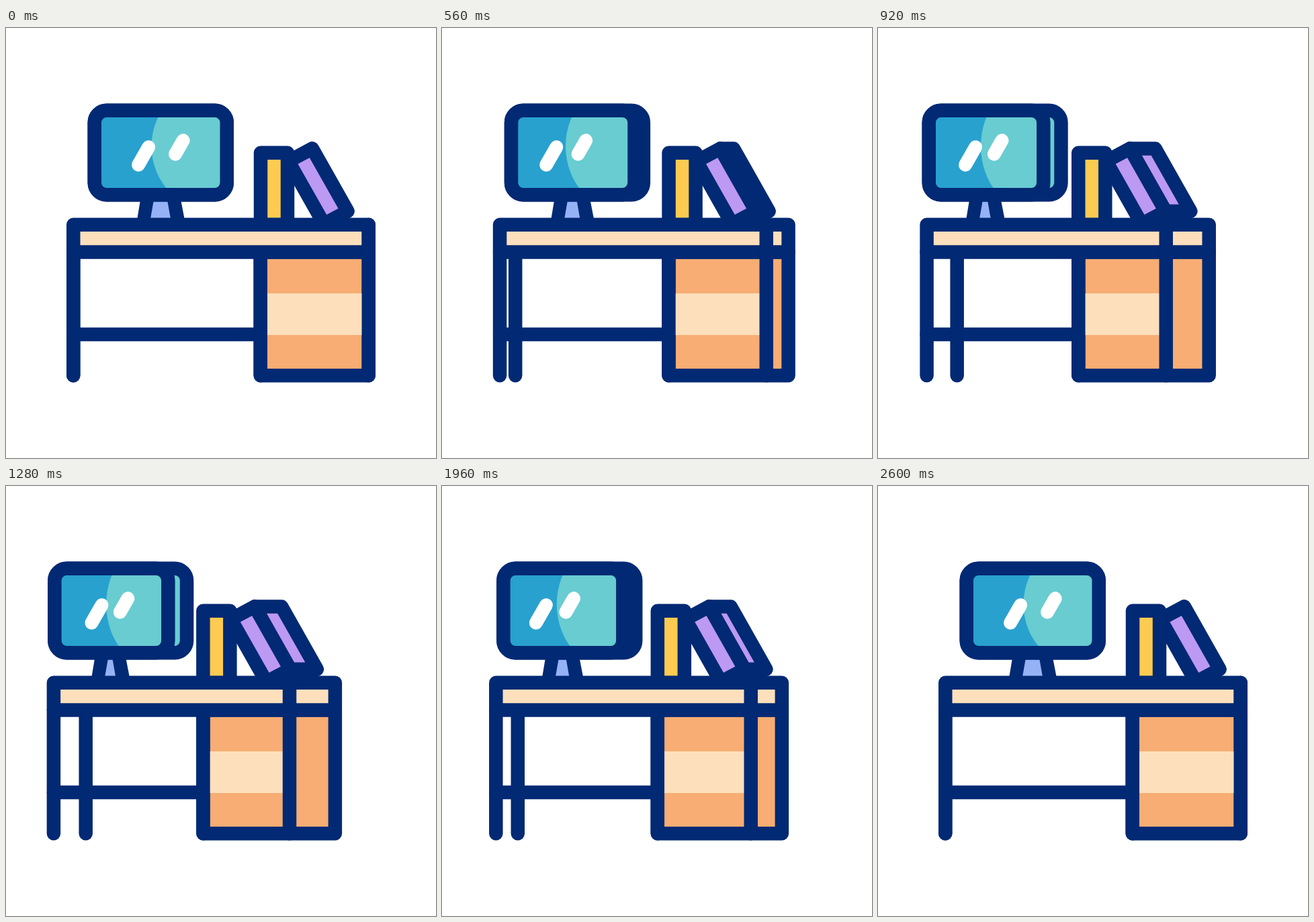
An HTML page with a canvas for the animation above (3000 ms loop, 640x640 px).

```html
<!DOCTYPE html>
<html lang="en">
<head>
<meta charset="utf-8">
<title>Turning desk</title>
<style>
  html, body { margin: 0; width: 100%; height: 100%; overflow: hidden; background: #fff; }
  canvas { display: block; width: 640px; height: 640px; }
</style>
</head>
<body>
<canvas id="stage" width="640" height="640"></canvas>
<script>
const LOOP = 3000, STEP = 40, LINE = 20.5, HALF = LINE / 2;
const INK = '#022973', CREAM = '#fddfbc', ORANGE = '#f7ad73', BLUE = '#28a1ce',
      TEAL = '#68ccd1', STEEL = '#95b2f6', YELLOW = '#fccb50', PURPLE = '#bc99f2';

// time, turn of the desk, slide of the glints, depth of the leaning book
const KEYS = [
  [0, 0, 0, 0], [200, 0, 0, 0], [360, .09, .13, 4], [560, .483, .6, 19.5],
  [760, .83, .88, 32.5], [920, .941, .96, 37.5], [1120, .985, .985, 39.3],
  [1360, 1, 1, 40], [1720, .97, .977, 39], [1880, .83, .91, 36],
  [1960, .678, .82, 32], [2280, .11, .157, 12.5], [2600, 0, 0, 0], [3000, 0, 0, 0]
];

const secant = (i, c) => (KEYS[i + 1][c] - KEYS[i][c]) / (KEYS[i + 1][0] - KEYS[i][0]);

function slope(i, c) {
  if (i === 0 || i === KEYS.length - 1) return 0;
  const a = secant(i - 1, c), b = secant(i, c);
  return a * b > 0 ? 2 * a * b / (a + b) : 0;
}

// monotone cubic between the keys
function track(t, c) {
  let i = 0;
  while (i < KEYS.length - 2 && t >= KEYS[i + 1][0]) i++;
  const span = KEYS[i + 1][0] - KEYS[i][0], u = (t - KEYS[i][0]) / span, v = 1 - u;
  return KEYS[i][c] * (1 + 2 * u) * v * v + KEYS[i + 1][c] * u * u * (3 - 2 * u)
    + span * u * v * (slope(i, c) * v - slope(i + 1, c) * u);
}

const ctx = document.getElementById('stage').getContext('2d');
ctx.lineJoin = ctx.lineCap = 'round';

function paint(fill, stroked) {
  if (fill) {
    ctx.fillStyle = fill;
    ctx.fill();
  }
  if (stroked) {
    ctx.strokeStyle = INK;
    ctx.lineWidth = LINE;
    ctx.stroke();
  }
}

function poly(points, fill, stroked) {
  ctx.beginPath();
  points.forEach(([x, y]) => ctx.lineTo(x, y));
  ctx.closePath();
  paint(fill, stroked);
}

function box(x1, y1, x2, y2, fill, stroked) {
  poly([[x1, y1], [x2, y1], [x2, y2], [x1, y2]], fill, stroked);
}

function line(x1, y1, x2, y2, color = INK, width = LINE) {
  ctx.beginPath();
  ctx.moveTo(x1, y1);
  ctx.lineTo(x2, y2);
  ctx.strokeStyle = color;
  ctx.lineWidth = width;
  ctx.stroke();
}

function roundBox(x1, y1, x2, y2, r) {
  ctx.beginPath();
  ctx.moveTo(x1 + r, y1);
  ctx.arcTo(x2, y1, x2, y2, r);
  ctx.arcTo(x2, y2, x1, y2, r);
  ctx.arcTo(x1, y2, x1, y1, r);
  ctx.arcTo(x1, y1, x2, y1, r);
  ctx.closePath();
}

function drawBooks(p, depth) {
  const dx = -85.8 * p;
  const top = [455.8 + dx, 179.4], foot = [508.6 + dx, 272.8];
  const back = ([x, y]) => [x + depth, y];
  if (depth > .2) poly([top, back(top), back(foot), foot], PURPLE, true);
  poly([[420.4 + dx, 198.2], top, foot, [473.2 + dx, 291.6]], PURPLE, true);
  box(379 + dx, 185.8, 419 + dx, 293, YELLOW, true);
}

function drawMonitor(p, q) {
  const l = 68 * p, r = 82 * p;
  poly([[201 - l, 250], [259 - r, 250], [266 - r, 286], [195 - l, 286]], INK);
  poly([[221 - l, 250], [239 - r, 250], [245 - r, 284], [215 - l, 284]], STEEL);

  const left = 131.75 - 59.5 * p, top = 122.75, bottom = 248.25, radius = 18;
  roundBox(left, top, 328.75 - 59.8 * p, bottom, radius);
  paint(TEAL, true);

  const right = 328.75 - 87.6 * p;
  roundBox(left, top, right, bottom, radius);
  paint(BLUE);
  ctx.save();
  ctx.clip();
  const rx = 99 * (1 - .16 * p);
  ctx.beginPath();
  ctx.ellipse(216.5 - 67.5 * p + rx, 176, rx, 99, 0, 0, 2 * Math.PI);
  paint(TEAL);
  ctx.restore();
  roundBox(left, top, right, bottom, radius);
  paint(null, true);

  const a = 69.8 * q, b = 82.5 * q;
  line(212.2 - a, 177.2, 197 - a, 203.7, '#fff', 20);
  line(263.7 - b, 167.3, 252 - b, 187.7, '#fff', 20);
}

function drawDesk(p) {
  const left = 100.25 - 29.4 * p, leg = 100.25 + 18.5 * p;
  const cabinet = 378.75 - 85.5 * p, front = 539.75 - 118 * p, side = 539.75 - 50 * p;
  const top = 292.75, mid = 333.5, bottom = 517.2;

  line(left, 456, cabinet, 456);
  line(left, mid, left, bottom);
  line(leg, mid, leg, bottom);

  box(cabinet, mid, side, bottom, ORANGE, true);
  box(cabinet, 395, front, 457, CREAM);
  line(cabinet, mid, cabinet, bottom);
  box(left, top, side, mid, CREAM, true);
  line(front, top, front, bottom);
}

function draw(now) {
  const t = Math.floor(now % LOOP / STEP) * STEP;
  const p = track(t, 1);
  ctx.fillStyle = '#fff';
  ctx.fillRect(0, 0, 640, 640);
  drawBooks(p, track(t, 3));
  drawMonitor(p, track(t, 2));
  drawDesk(p);
}

let start = null;
function tick(now) {
  if (start === null) start = now;
  draw(Math.max(0, now - start));
  requestAnimationFrame(tick);
}
draw(0);
requestAnimationFrame(tick);
</script>
</body>
</html>
```
